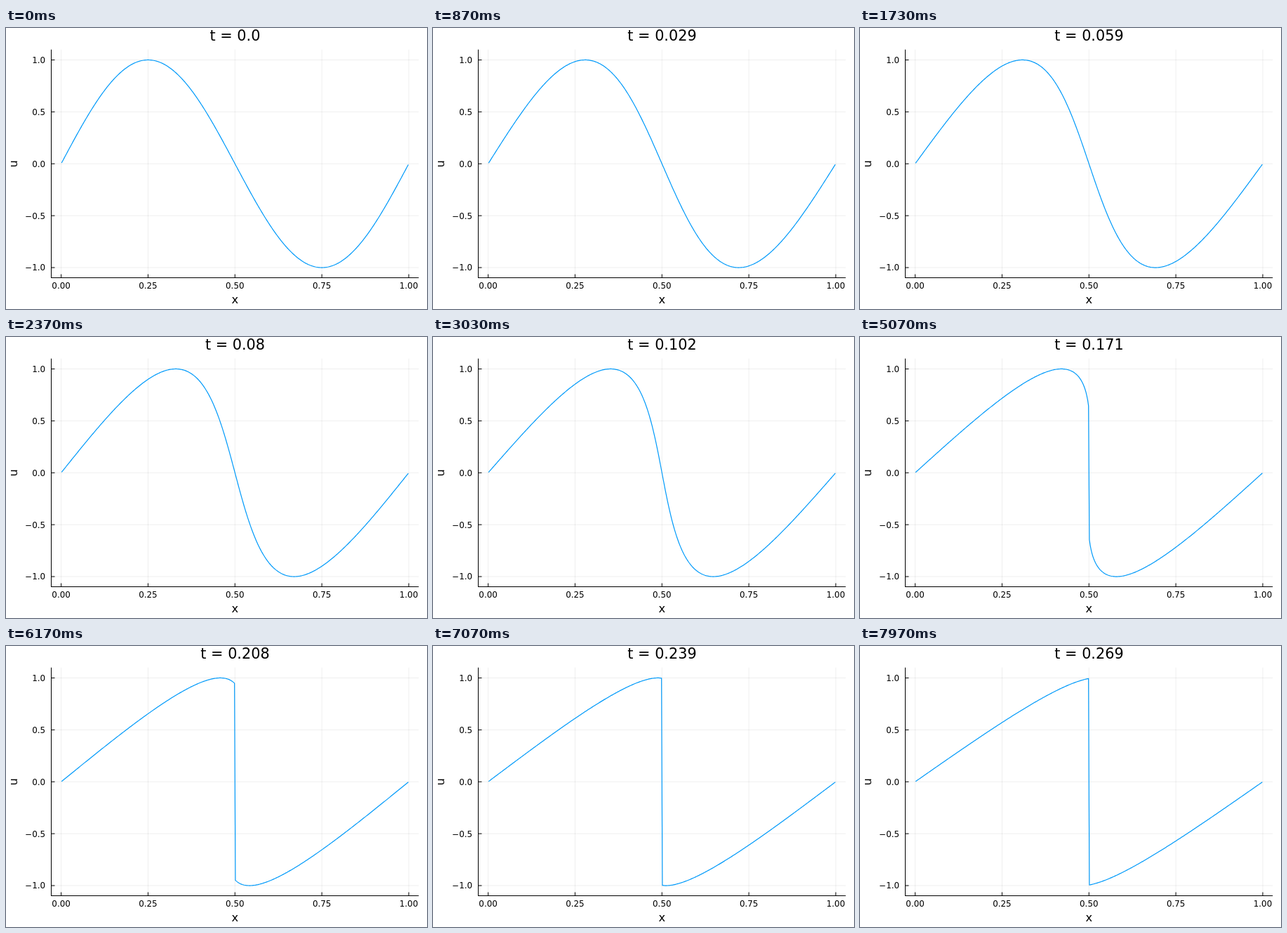
Animation of 600 by 400 pixels, one loop 8 s. Source, as an HTML page:

```html
<!DOCTYPE html>
<html lang="en">
<head>
<meta charset="utf-8">
<title>Wave steepening</title>
<style>
  html, body { margin: 0; width: 100%; height: 100%; overflow: hidden; background: #fff; }
  svg { display: block; width: 600px; height: 400px; font-family: "DejaVu Sans", sans-serif; }
  text { fill: #000; text-anchor: middle; }
  path { fill: none; }
  #grid { stroke: #000; stroke-opacity: .065; }
  #axes { stroke: #000; }
  #curve { stroke: #009afa; stroke-width: 1.2; stroke-linejoin: round; }
  #ticks text { font-size: 11.9px; }
  #ticks .y { text-anchor: end; }
  .guide { font-size: 16.3px; }
  #title { font-size: 20.8px; }
</style>
</head>
<body>
<svg viewBox="0 0 600 400">
  <path id="grid"/>
  <path id="axes"/>
  <g id="ticks"></g>
  <text class="guide" x="326.3" y="391.7">x</text>
  <text class="guide" transform="translate(16.3 193.3) rotate(-90)">u</text>
  <path id="curve"/>
  <text id="title" x="326.5" y="18"></text>
</svg>
<script>
const LOOP = 8000, CELLS = 400, DT = 0.45 / CELLS, TAU = 2 * Math.PI;
const LEFT = 64.5, RIGHT = 588.2, TOP = 30.7, BOTTOM = 355.5, TICK = 5;
const byId = id => document.getElementById(id);
const px = x => 326.3 + (x - 0.5) * 495.4;
const py = u => 193.25 - u * 147.8;

function addLabel(text, x, y, cls) {
  const node = document.createElementNS("http://www.w3.org/2000/svg", "text");
  node.setAttribute("x", x);
  node.setAttribute("y", y);
  node.setAttribute("class", cls);
  node.textContent = text;
  byId("ticks").append(node);
}

function drawFrame() {
  let grid = "";
  let axes = `M${LEFT} ${TOP}V${BOTTOM + .5}M${LEFT - .5} ${BOTTOM}H${RIGHT}`;
  for (let i = 0; i <= 4; i++) {
    const xv = i / 4, yv = i / 2 - 1, x = px(xv), y = py(yv);
    grid += `M${x} ${TOP}V${BOTTOM}M${LEFT} ${y}H${RIGHT}`;
    axes += `M${x} ${BOTTOM}v${-TICK}M${LEFT} ${y}h${TICK}`;
    addLabel(xv.toFixed(2), x, 371.4, "x");
    addLabel(yv.toFixed(1).replace("-", "−"), 56.2, y + 4.4, "y");
  }
  byId("grid").setAttribute("d", grid);
  byId("axes").setAttribute("d", axes);
}

// Inviscid Burgers equation with u(x, 0) = sin(2πx): trace the characteristic
// back to its foot, staying on the branch left of the shock at x = 0.5.
function wave(x, t) {
  if (x > 0.5) return -wave(1 - x, t);
  let lo = 0, hi = TAU * t > 1 ? Math.acos(-1 / (TAU * t)) / TAU : 0.5;
  for (let i = 0; i < 32; i++) {
    const mid = (lo + hi) / 2;
    if (mid + t * Math.sin(TAU * mid) < x) lo = mid; else hi = mid;
  }
  return Math.sin(TAU * lo);
}

function render(step) {
  const t = step * DT;
  const points = Array.from({ length: CELLS }, (_, i) => {
    const x = (i + 0.5) / CELLS;
    return px(x).toFixed(2) + " " + py(wave(x, t)).toFixed(2);
  });
  byId("curve").setAttribute("d", "M" + points.join("L"));
  const shown = Math.round(step * 1.125) / 1000;
  byId("title").textContent = "t = " + (shown || "0.0");
}

// 30 steps per second, with step times rounded to 10 ms.
const stepAt = ms => Math.floor((Math.floor(ms / 10) + 0.5) * 0.3);

const start = performance.now();
let current = -1;
function tick() {
  const step = stepAt((performance.now() - start) % LOOP);
  if (step !== current) render(current = step);
  requestAnimationFrame(tick);
}
drawFrame();
tick();
</script>
</body>
</html>
```
